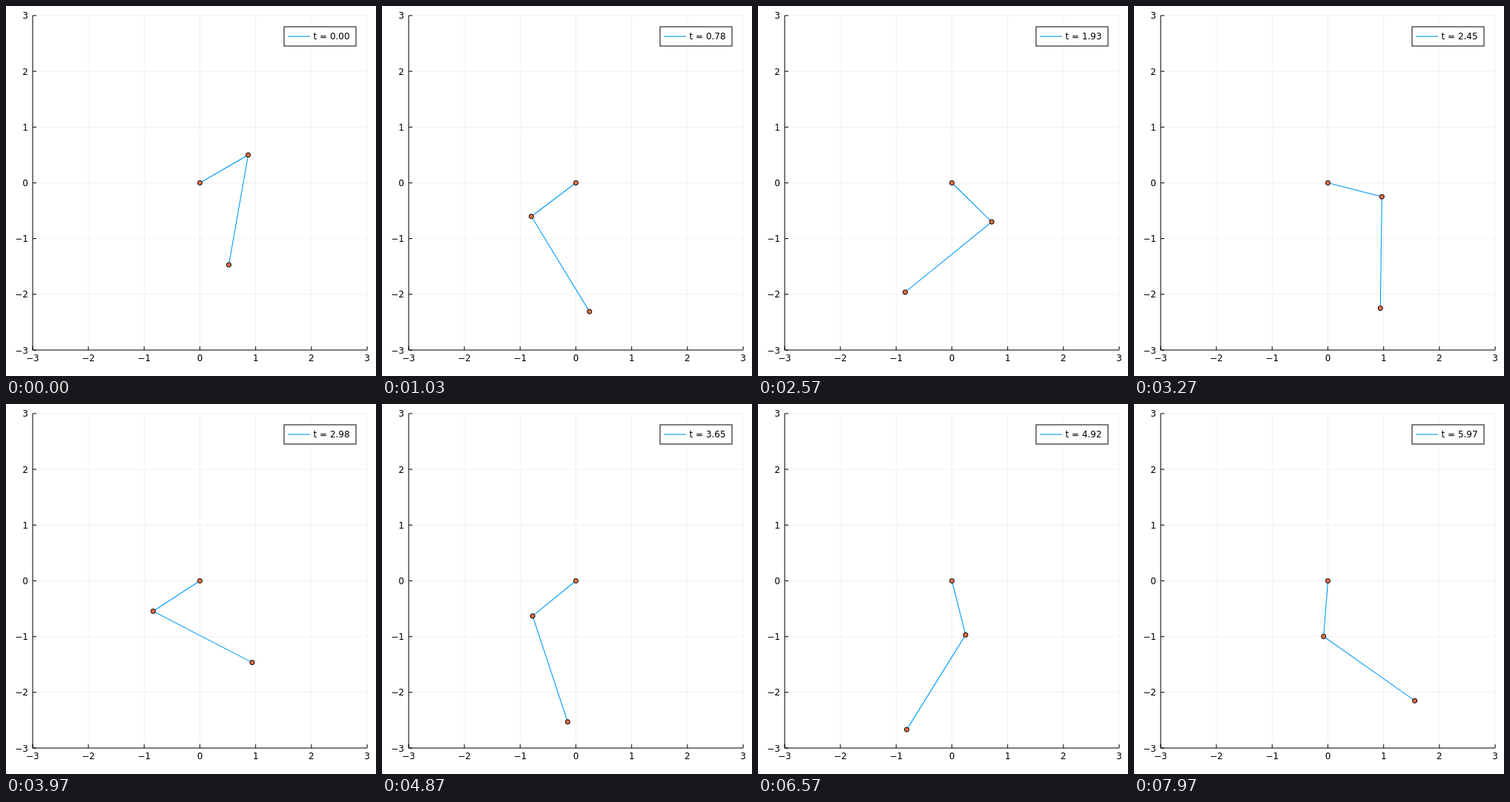
Recreate the animation shown at these times as an HTML page. Size 499 px wide and 499 px high, loop 8000 ms.

```html
<!DOCTYPE html>
<html>
<head>
<meta charset="utf-8">
<style>
  html, body { margin: 0; width: 100%; height: 100%; overflow: hidden; background: #fff; }
  svg { display: block; width: 499px; height: 499px; }
  text { font: 12px "DejaVu Sans", sans-serif; }
  path, rect { fill: none; stroke: #000; }
  .grid { stroke-opacity: .1; stroke-width: .6; }
  .rod { stroke: #009afa; stroke-width: 1.1; }
  circle { fill: #e26f46; stroke: #000; }
</style>
</head>
<body>
<svg viewBox="0 0 499 499">
  <path class="grid" id="grid"/>
  <path id="axes"/>
  <g id="labels"></g>
  <path class="rod" id="rods"/>
  <g id="joints"></g>
  <rect x="375" y="28" width="97" height="26" style="fill:#fff"/>
  <path class="rod" d="M380 41H410"/>
  <text id="clock" x="414.5" y="45.4"></text>
</svg>
<script>
const $ = id => document.getElementById(id);
const FRAMES = 240, LOOP = 8000, STEPS = 50, DT = 1 / 40;
const G = 9.81, M1 = 1, M2 = 2, L1 = 1, L2 = 2;
const px = x => 261.5 + 75.2 * x;
const py = y => 238.5 - 75.2 * y;

function add(parent, tag, attrs, text = '') {
  const node = document.createElementNS('http://www.w3.org/2000/svg', tag);
  for (const key in attrs) node.setAttribute(key, attrs[key]);
  node.textContent = text;
  return parent.appendChild(node);
}

function drawAxes() {
  let grid = '', axes = 'M36 13V464H487';
  for (let v = -3; v <= 3; v++) {
    const x = px(v), y = py(v), label = String(v).replace('-', '\u2212');
    grid += `M${x} 13V464M36 ${y}H487`;
    axes += `M${x} 464v-5M36 ${y}h5`;
    add($('labels'), 'text', { x, y: 479, 'text-anchor': 'middle' }, label);
    add($('labels'), 'text', { x: 30, y: y + 4.4, 'text-anchor': 'end' }, label);
  }
  $('grid').setAttribute('d', grid);
  $('axes').setAttribute('d', axes);
}

// Double pendulum; angles are measured from straight down.
function derivative([a, b, va, vb]) {
  const s = Math.sin(a - b), c = Math.cos(a - b), mu = M2 / (M1 + M2);
  const pull = G * Math.sin(b) - L1 * va * va * s;
  const accA = (-G * Math.sin(a) - mu * L2 * vb * vb * s + mu * c * pull) / (L1 * (1 - mu * c * c));
  return [va, vb, accA, (-pull - L1 * accA * c) / L2];
}

function rungeKutta(state, h) {
  const shift = (k, f) => state.map((v, i) => v + f * k[i]);
  const k1 = derivative(state), k2 = derivative(shift(k1, h / 2));
  const k3 = derivative(shift(k2, h / 2)), k4 = derivative(shift(k3, h));
  return state.map((v, i) => v + h / 6 * (k1[i] + 2 * k2[i] + 2 * k3[i] + k4[i]));
}

const states = [[2 * Math.PI / 3, -Math.PI / 18, 0, 0]];
while (states.length < FRAMES) {
  let state = states.at(-1);
  for (let i = 0; i < STEPS; i++) state = rungeKutta(state, DT / STEPS);
  states.push(state);
}

drawAxes();
const joints = [0, 1, 2].map(() => add($('joints'), 'circle', { r: 3.1, cx: px(0), cy: py(0) }));

function show(n) {
  const [a, b] = states[n];
  const x = L1 * Math.sin(a), y = -L1 * Math.cos(a);
  const points = [[0, 0], [x, y], [x + L2 * Math.sin(b), y - L2 * Math.cos(b)]]
    .map(([u, v]) => [px(u), py(v)]);
  $('rods').setAttribute('d', 'M' + points.join('L'));
  joints.forEach((joint, i) => {
    joint.setAttribute('cx', points[i][0]);
    joint.setAttribute('cy', points[i][1]);
  });
  $('clock').textContent = 't = ' + (n / 40).toFixed(2);
}

// 30 pictures a second, switching on whole hundredths of a second.
function tick() {
  const time = Math.floor(performance.now() % LOOP / 10) * 10;
  show(Math.min(FRAMES - 1, Math.floor((time + 4) * .03)));
  requestAnimationFrame(tick);
}
tick();
</script>
</body>
</html>
```
